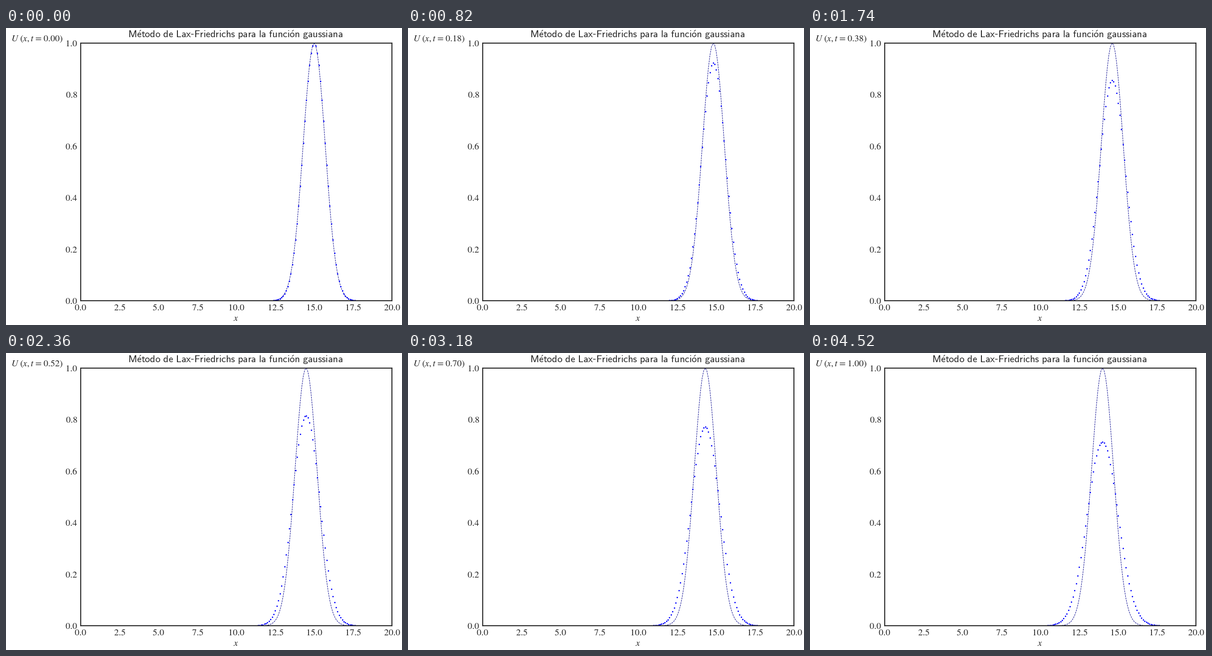
Animation of 864 by 648 pixels, one loop 4620 ms. Source, as a matplotlib script:

```python
import numpy as np
import matplotlib.pyplot as plt
from matplotlib.animation import FuncAnimation

W, H = 864, 648
INK = "0.15"
TICK_MS = 20
STEPS = 51
DX, DT, SPEED = 0.1, 0.02, -1.0

plt.rcParams.update({
    "font.family": "Liberation Serif",
    "font.size": 20,
    "mathtext.fontset": "stix",
    "text.color": INK,
    "axes.edgecolor": INK,
    "axes.linewidth": 2.2,
    "xtick.labelcolor": INK,
    "ytick.labelcolor": INK,
})

x = np.linspace(0, 20, 201)


def exact(t):
    return np.exp(-(x - SPEED * t - 15) ** 2)


def lax_friedrichs(u):
    nu = SPEED * DT / DX
    new = np.zeros_like(u)
    new[1:-1] = (u[2:] + u[:-2]) / 2 - nu / 2 * (u[2:] - u[:-2])
    return new


waves = [exact(0)]
for _ in range(STEPS - 1):
    waves.append(lax_friedrichs(waves[-1]))

# Each step holds for 100 ms, except a 20 ms one in every nine.
holds = [1 if k % 9 == 4 else 5 for k in range(STEPS)]
schedule = np.repeat(np.arange(STEPS), holds)

fig = plt.figure(figsize=(W / 72, H / 72), dpi=72, facecolor="white")
left, right, top, bottom = 162.5, 842.3, 33, 595
ax = fig.add_axes([left / W, 1 - bottom / H, (right - left) / W, (bottom - top) / H])
ax.set(xlim=(0, 20), ylim=(0, 1))
ax.set_xticks(np.arange(0, 20.1, 2.5))
ax.set_yticks(np.arange(0, 1.1, 0.2))
ax.xaxis.set_major_formatter(lambda v, _: f"${v:.1f}$")
ax.yaxis.set_major_formatter(lambda v, _: f"${v:.1f}$")
ax.tick_params(length=0, pad=7)


def put(px, py, text, **kw):
    return fig.text(px / W, 1 - py / H, text, va="baseline", **kw)


def time_label(t):
    # The extra space brings "=" to TeX's relation spacing.
    return rf"$U\ (x,t\hspace{{0.08}}=\hspace{{0.08}}{t:.2f})$"


put(500, 21, r"$\mathsf{M\acute{e}todo\ de\ Lax}$-$\mathsf{Friedrichs\ para\ la"
    r"\ funci\acute{o}n\ gaussiana}$", ha="center", size=22,
    family="Liberation Sans", math_fontfamily="cm")
put(502, 639, "$x$", ha="center")
clock = put(124.2, 28.5, time_label(0), ha="right")

curve, = ax.plot(x, waves[0], "--", color="darkblue", lw=1)
dots, = ax.plot(x, waves[0], "o", color="blue", ms=3, mew=0)


def update(tick):
    k = schedule[tick]
    t = k * DT
    curve.set_ydata(exact(t))
    dots.set_ydata(waves[k])
    clock.set_text(time_label(t))
    return curve, dots, clock


anim = FuncAnimation(fig, update, frames=len(schedule), interval=TICK_MS,
                     repeat=True, repeat_delay=0, cache_frame_data=False)
plt.show()
```
